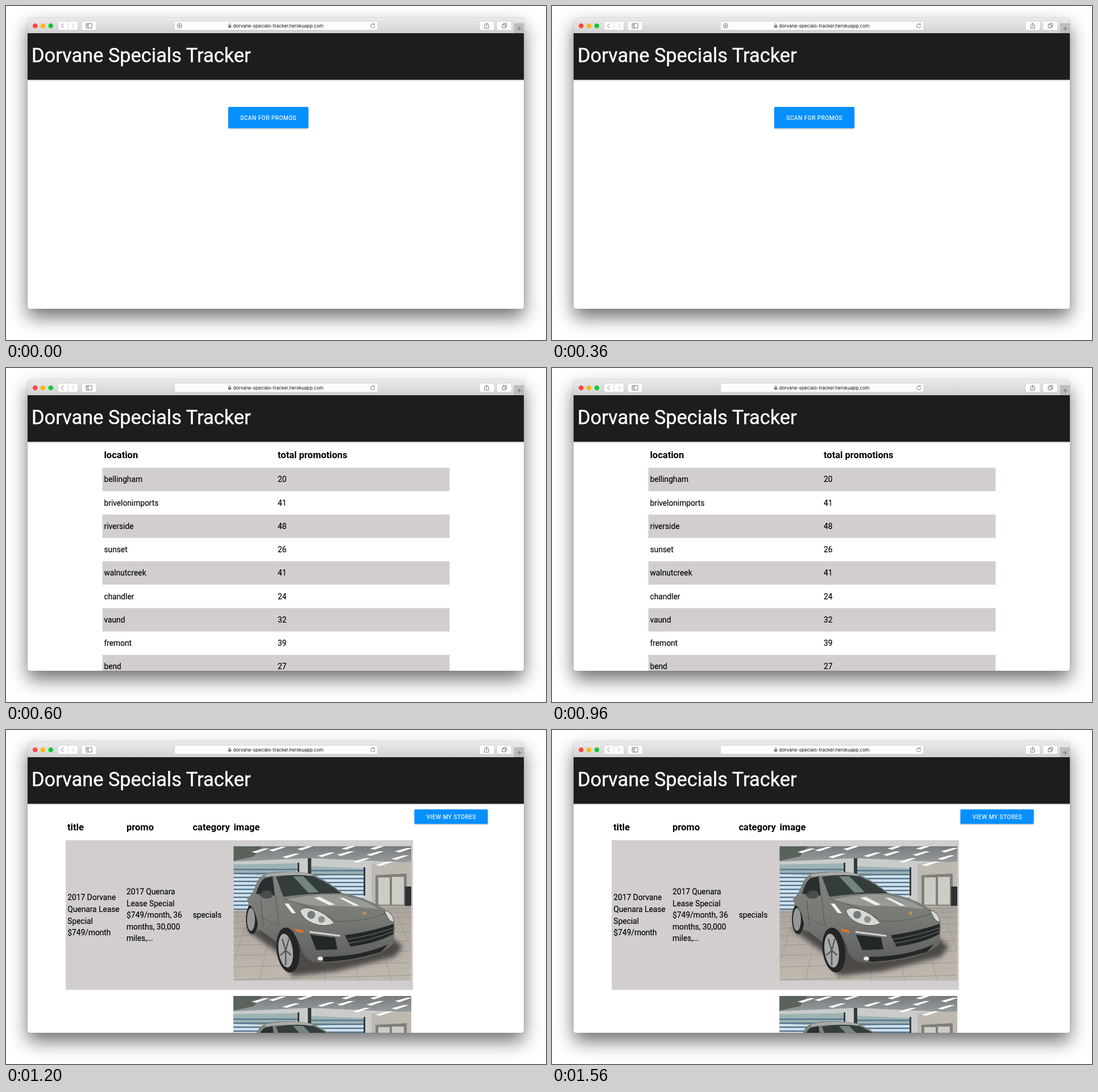
These frames come from a looping animation (950 by 589 pixels, 1.8 s). An HTML page:

```html
<!DOCTYPE html>
<html lang="en">
<head>
<meta charset="utf-8">
<title>Specials Tracker</title>
<style>
  html, body { margin: 0; width: 100%; height: 100%; overflow: hidden; background: #fff; }
  #window {
    position: absolute; left: 38px; top: 21px; width: 873px; height: 513px;
    border-radius: 4px; overflow: hidden; background: #fff;
    box-shadow: 0 0 1px rgba(0,0,0,.55), 0 15px 32px rgba(0,0,0,.56);
  }
  svg { display: block; }
  text { font: 13.75px Roboto, sans-serif; fill: #000; stroke: #000; stroke-width: .15; white-space: pre; }
  .head { font-size: 16.5px; font-weight: 700; stroke: none; }
  .brand { font-size: 34.375px; fill: #fff; stroke: #fff; stroke-width: .4; }
  .url { font: 8.1px Inter, sans-serif; fill: #111; stroke: none; }
  .label { font-size: 10px; letter-spacing: .55px; fill: #fff; stroke: #fff; stroke-width: .2; }
  .btn { fill: #0590ff; filter: drop-shadow(0 1px 1px rgba(0,0,0,.3)); }
  .key { fill: #fdfdfd; stroke: #c6c4c6; stroke-width: .6; }
  .icon { fill: none; stroke: #666; stroke-width: .9; }
  .row { fill: #d2cece; }
  .scene { opacity: 0; }
</style>
</head>
<body>
<div id="window">
<svg width="873" height="513" viewBox="38 21 873 513">
  <defs>
    <linearGradient id="bar" x2="0" y2="1">
      <stop stop-color="#ebe9eb"/><stop offset="1" stop-color="#d3d1d3"/>
    </linearGradient>
    <linearGradient id="ceiling" x2="0" y2="1">
      <stop stop-color="#777b7d"/><stop offset="1" stop-color="#a5a9aa"/>
    </linearGradient>
    <linearGradient id="floor" x2="0" y2="1">
      <stop stop-color="#aaa49d"/><stop offset="1" stop-color="#c0b8af"/>
    </linearGradient>
    <linearGradient id="paint" x2="0" y2="1">
      <stop stop-color="#7f827e"/><stop offset=".5" stop-color="#787a76"/><stop offset="1" stop-color="#5c5f5c"/>
    </linearGradient>
    <filter id="soft" x="-20%" y="-40%" width="140%" height="180%"><feGaussianBlur stdDeviation="4"/></filter>
    <clipPath id="frame"><rect x="400.5" y="205" width="312.5" height="237"/></clipPath>

    <g id="photo" clip-path="url(#frame)">
      <rect x="400" y="205" width="313" height="40" fill="url(#ceiling)"/>
      <path fill="#59635b" d="M400 205h50l-14 18 -36 8z"/>
      <path fill="#c9cccb" d="M400 232l135-6 178 8v90H400z"/>
      <path fill="#d3e3ed" d="M400 237l113-2v85H400zM537 240l92 4v66h-92z"/>
      <path fill="#7d938c" opacity=".6" d="M400 237l113-2v14l-50 8 -63-3zM537 240l92 4v10l-92 4z"/>
      <g id="blinds" fill="none" stroke="#54768f" stroke-width="2.4"></g>
      <path fill="#34393b" d="M531 226h6v34h-6zM513 234h3v26h-3zM629 242h3v50h-3z"/>
      <path fill="#bdb9b1" d="M643 236l70-4v80h-70z"/>
      <path fill="#817f78" d="M650 256l55-3v57h-55z"/>
      <path fill="#cbcdc5" d="M655 260h20v48h-20zM679 259h21v49h-21z"/>
      <path fill="#2e3031" d="M702 276h11v37h-11z"/>
      <g id="lamps" fill="#fff"></g>
      <path fill="url(#floor)" d="M400 318l313-8v132H400z"/>
      <g id="tiles" fill="none" stroke="#989188" stroke-width=".8"></g>

      <path fill="#4d4a47" filter="url(#soft)" d="M420 350l60 44 24 40 76-8 104-26 14-18-36-30z"/>
      <ellipse cx="433" cy="333" rx="11" ry="27" fill="#242626"/>
      <ellipse cx="431" cy="334" rx="7" ry="20" fill="#969897"/>
      <path fill="url(#paint)" d="M424 298Q434 290 440 272Q446 256 462 252Q505 246 541 255Q566 266 591 287Q642 298 668 318Q684 328 684 350L681 378Q660 396 628 402Q580 413 546 410Q522 406 518 380L505 356Q493 340 481 355L476 374 444 350Q440 314 427 308z"/>
      <path fill="#a9aca8" d="M455 255Q505 246 541 255L536 258Q495 253 457 259z"/>
      <path fill="#29302f" d="M440 289Q446 266 456 261L469 258 473 292z"/>
      <path fill="#333d3c" d="M475 259Q510 253 541 258Q568 270 590 288Q535 287 488 294z"/>
      <path fill="#758480" d="M505 258l18 0 27 28-18 1z"/>
      <path fill="#4a4d4b" d="M446 292Q452 280 465 284Q472 290 466 296Q454 300 446 292z"/>
      <path fill="#979a95" d="M492 299Q550 287 590 291Q634 300 656 316Q600 309 558 311Q520 308 492 299z"/>
      <path fill="#eceeea" d="M542 296l10-2 27 14-10 1zM586 296l8 0 28 14-9 0zM490 306l7 0 13 17-7 0z"/>
      <path fill="none" stroke="#555855" d="M474 292L480 345M448 300L453 345M444 328L478 345M488 298Q540 310 582 338Q632 338 672 322"/>
      <path fill="#d5d8d3" stroke="#464947" d="M517 319Q523 311 538 315Q563 322 578 341Q560 349 540 341Q522 334 517 319z"/>
      <circle cx="537" cy="326" r="7" fill="#777b79"/>
      <circle cx="555" cy="334" r="6" fill="#8d918e"/>
      <path fill="#d5d8d3" stroke="#464947" d="M665 318Q680 320 683 338Q676 340 670 328z"/>
      <path fill="#242727" d="M596 362Q640 356 682 342L681 360Q652 376 606 382zM535 361L579 366 583 387 546 388zM553 400Q620 401 672 378L660 391Q610 407 560 409z"/>
      <path fill="none" stroke="#777b78" d="M600 369Q642 363 681 349M603 376Q645 370 681 355"/>
      <path fill="none" stroke="#d3d5d2" stroke-width="3" d="M534 356L588 363"/>
      <ellipse cx="553" cy="403" rx="5" ry="3.5" fill="#e5e7e5"/>
      <path fill="#df7427" d="M508 350l15 3v5l-13-3z"/>
      <circle cx="630.5" cy="323" r="3" fill="#b89450"/>
      <ellipse cx="496" cy="388" rx="20" ry="40" transform="rotate(-7 496 388)" fill="#242626"/>
      <ellipse cx="492" cy="389" rx="12.5" ry="30" transform="rotate(-7 492 389)" fill="#a9abaa"/>
      <g id="spokes" stroke="#565957" stroke-width="2.5"></g>
    </g>
  </defs>

  <g id="toolbar">
    <rect x="38" y="21" width="873" height="27" fill="url(#bar)"/>
    <circle cx="51.3" cy="35" r="4.3" fill="#fc4642"/>
    <circle cx="65" cy="35" r="4.3" fill="#fdb813"/>
    <circle cx="78.8" cy="35" r="4.3" fill="#0fca34"/>
    <g class="key">
      <rect x="91.5" y="27" width="35" height="15.5" rx="2.5"/>
      <rect x="133" y="27" width="26" height="15.5" rx="2.5"/>
      <rect x="296.5" y="27" width="357.5" height="15.5" rx="2.5"/>
      <rect x="833" y="27" width="26" height="15.5" rx="2.5"/>
      <rect x="863.5" y="27" width="26" height="15.5" rx="2.5"/>
      <path d="M109 27v15.5"/>
    </g>
    <rect x="894.5" y="31" width="17" height="17" fill="#bebcbe" stroke="#a7a5a7" stroke-width=".6"/>
    <g class="icon">
      <path d="M101.5 30.8l-4 4 4 4"/>
      <path stroke="#bbb" d="M116 30.8l4 4-4 4"/>
      <path d="M141 31h10v8h-10zM144.5 31v8M142 33.2h1.5M142 35h1.5"/>
      <path d="M843.7 33.2h-1.7v6h7v-6h-1.7M845.5 36.5v-6.3M843.5 32l2-2 2 2"/>
      <path d="M873 33h5.500v5.500h-5.500zM875 33v-2.2h5.7v5.6h-2.2"/>
      <path d="M647.7 32.7a3.5 3.5 0 1 0 .9 2.3M648 30.5v2.5h-2.5"/>
      <path d="M899 40h8M903 36v8"/>
      <path d="M391.9 34.5v-1.5a1.6 1.6 0 0 1 3.2 0v1.5"/>
    </g>
    <rect x="390.9" y="34.3" width="5.2" height="4" rx=".5" fill="#777"/>
    <text class="url" x="399.5" y="37.9">dorvane-specials-tracker.herokuapp.com</text>
  </g>

  <g id="scan" class="scene">
    <g class="icon"><circle cx="305.3" cy="34.9" r="4"/><path d="M303 34.9h4.6M305.3 32.6v4.6"/></g>
    <rect class="btn" x="391" y="178" width="141" height="37.5" rx="1.5"/>
    <text class="label" x="412.3" y="200.5">SCAN FOR PROMOS</text>
  </g>
  <g id="stores" class="scene"></g>
  <g id="promos" class="scene">
    <rect class="btn" x="718.5" y="140" width="129" height="25.5" rx="1.5"/>
    <text class="label" x="739.8" y="156.5">VIEW MY STORES</text>
    <rect class="row" x="105" y="194.3" width="611" height="264"/>
    <use href="#photo"/>
    <use href="#photo" y="264"/>
  </g>

  <rect x="38" y="48" width="873" height="82" fill="#1d1d1d" style="filter:drop-shadow(0 1px 1px rgba(0,0,0,.35))"/>
  <text class="brand" x="45" y="98.7">Dorvane Specials Tracker</text>
</svg>
</div>
<script>
const $ = id => document.getElementById(id);

function add(parent, tag, attrs, text = '') {
  const node = document.createElementNS('http://www.w3.org/2000/svg', tag);
  for (const key in attrs) node.setAttribute(key, attrs[key]);
  node.textContent = text;
  parent.append(node);
}

const write = (parent, x, y, text, cls = '') => add(parent, 'text', { x, y, class: cls }, text);

function paragraph(parent, x, middle, lines) {
  const step = 20.625;
  lines.forEach((line, i) =>
    write(parent, x, middle + 5 + (i - (lines.length - 1) / 2) * step, line));
}

// Store list
const stores = $('stores');
write(stores, 172.5, 158.5, 'location', 'head');
write(stores, 478, 158.5, 'total promotions', 'head');
[
  ['bellingham', 20], ['brivelonimports', 41], ['riverside', 48],
  ['sunset', 26], ['walnutcreek', 41], ['chandler', 24],
  ['vaund', 32], ['fremont', 39], ['bend', 27]
].forEach(([place, total], i) => {
  const y = 175.9 + i * 41.25;
  if (i % 2 === 0) add(stores, 'rect', { class: 'row', x: 169.5, y, width: 611, height: 41.25 });
  write(stores, 172.5, y + 25.4, place);
  write(stores, 478, y + 25.4, total);
});

// Promotion list
const promos = $('promos');
[['title', 108], ['promo', 212], ['category', 328.5], ['image', 400.5]]
  .forEach(([name, x]) => write(promos, x, 177, name, 'head'));
paragraph(promos, 108.3, 326.2, ['2017 Dorvane', 'Quenara Lease', 'Special', '$749/month']);
paragraph(promos, 212, 326.2, ['2017 Quenara', 'Lease Special', '$749/month, 36', 'months, 30,000', 'miles,...']);
paragraph(promos, 328.7, 326.2, ['specials']);

// Showroom details
for (let y = 246; y < 318; y += 7) {
  add($('blinds'), 'path', { d: `M400 ${y}H513${y < 310 ? `M537 ${y + 2}H629` : ''}` });
}
[[432, 215], [462, 212], [486, 224], [512, 210], [548, 222], [582, 220],
 [590, 209], [610, 232], [634, 220], [640, 209], [650, 238], [678, 227], [684, 214]]
  .forEach(([x, y]) => add($('lamps'), 'path', { d: `M${x} ${y}l22-6h9l-23 8z` }));
for (let i = 0; i < 9; i++) {
  const y = 322 + i * i * 1.1 + i * 6;
  add($('tiles'), 'path', { d: `M400 ${y}L713 ${y - 8}M${390 + i * 42} 316L${330 + i * 58} 442` });
}
for (let i = 0; i < 5; i++) {
  const a = i * Math.PI * 0.4 + 0.3;
  add($('spokes'), 'line', { x1: 492, y1: 389, x2: 492 + 10 * Math.cos(a), y2: 389 + 26 * Math.sin(a) });
}

// Each scene holds for an equal share of the loop
const scenes = ['scan', 'stores', 'promos'], hold = 600;
scenes.forEach((id, i) => {
  const steps = [0, 1, 2, 3].map(k => ({
    offset: k / 3, opacity: Math.min(k, 2) === i ? 1 : 0, easing: 'step-end'
  }));
  $(id).animate(steps, { duration: hold * scenes.length, iterations: Infinity });
});
</script>
</body>
</html>
```
